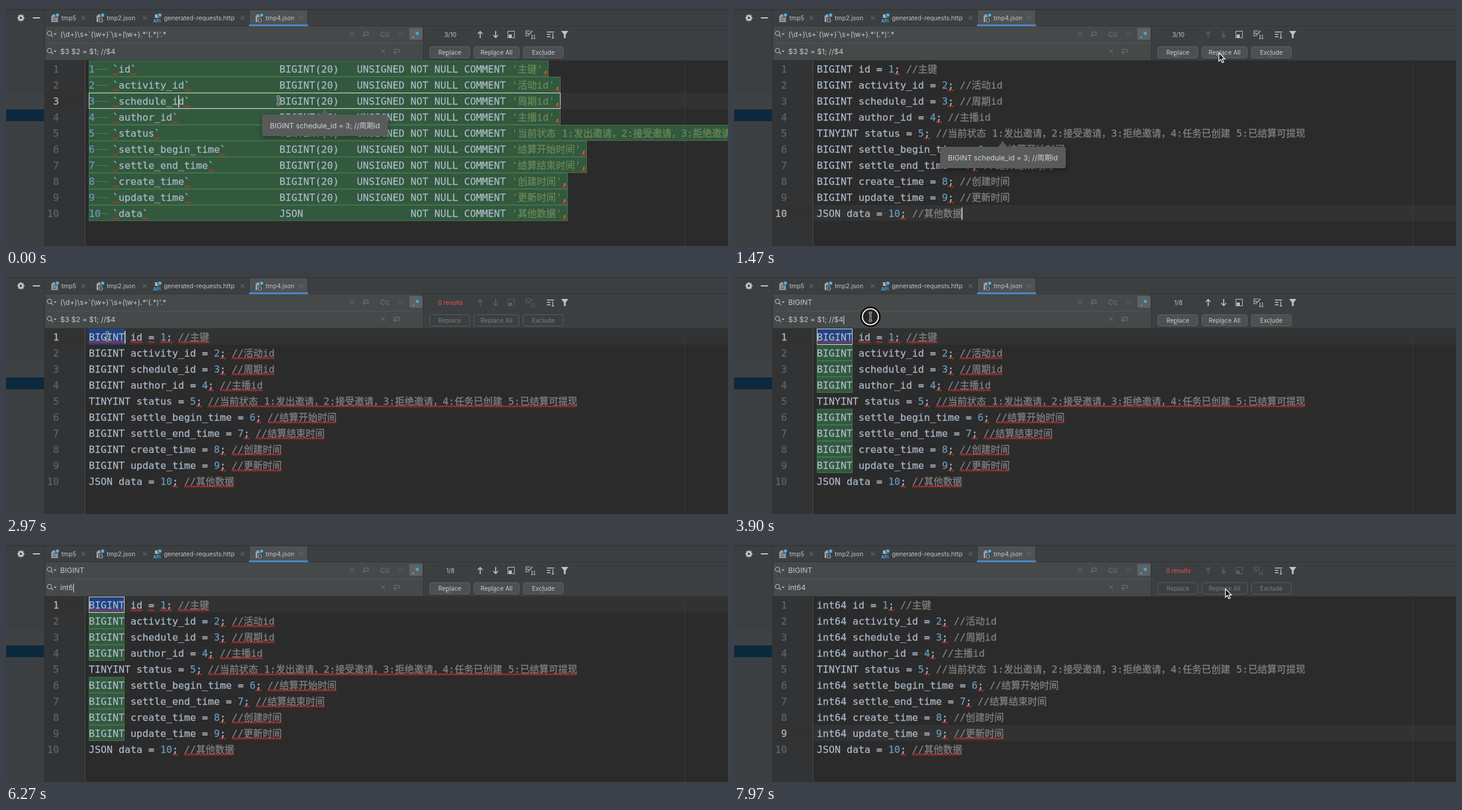
Animation of 1212x404 px, one loop 8 s. Source, as an HTML page with a canvas:

```html
<!DOCTYPE html>
<html lang="zh">
<head>
<meta charset="utf-8">
<style>
html, body { margin: 0; height: 100%; overflow: hidden; background: #2b2b2b; }
canvas { display: block; }
</style>
</head>
<body>
<canvas id="stage" width="1212" height="404"></canvas>
<script>
const g = document.getElementById('stage').getContext('2d');
const LOOP = 8000, TOP = 92, ROW = 27, LEFT = 139;
const UI = 'Inter, "Noto Sans CJK SC", sans-serif';
const MONO = '16.61px "DejaVu Sans Mono", monospace';
const HAN = '500 16px "Noto Sans CJK SC", "Noto Sans CJK", sans-serif';
const INK = '#a9b7c6', NUM = '#6897bb', STR = '#6a8759', NOTE = '#808080', ICON = '#afb1b3', DIM = '#5c5f61';
const FAINT = '#686b6d', EDGE = '#323537';

// Moments at which the state changes
const AT = { replace: 1420, recount: 1530, popupOff: 1640, reparse: 1900, select: 2850,
  find: 3250, focus: 3800, erase: 4450, hide: 4500, show: 6720, replace2: 7650 };
const TYPED = [[5000, 'i'], [5090, 'in'], [5400, 'int'], [6130, 'int6'], [6520, 'int64']];
const MOUSE = [[0, 457, 159], [450, 457, 159], [1280, 814, 79], [1750, 814, 79], [2600, 170, 105],
  [3330, 170, 105], [3780, 229, 72], [6740, 229, 72], [7450, 825, 79], [8000, 825, 79]];
const OLD_TEXT = '$3 $2 = $1; //$4';

const rows = [
  ['id', '主键'], ['activity_id', '活动id'], ['schedule_id', '周期id'], ['author_id', '主播id'],
  ['status', '当前状态 1:发出邀请，2:接受邀请，3:拒绝邀请，4:任务已创建 5:已结算可提现', 'TINYINT'],
  ['settle_begin_time', '结算开始时间'], ['settle_end_time', '结算结束时间'],
  ['create_time', '创建时间'], ['update_time', '更新时间'], ['data', '其他数据', 'JSON']
].map(([name, note, type = 'BIGINT']) => ({ name, note, type }));

const box = (x, y, w, h, c) => { g.fillStyle = c; g.fillRect(x, y, w, h); };
const frame = (x, y, w, h, c) => { g.strokeStyle = c; g.lineWidth = 1; g.strokeRect(x + .5, y + .5, w - 1, h - 1); };
function path(points, c, w = 1.3, fill) {
  g.beginPath();
  points.forEach(([x, y]) => g.lineTo(x, y));
  if (fill) { g.closePath(); g.fillStyle = fill; g.fill(); }
  if (c) { g.strokeStyle = c; g.lineWidth = w; g.stroke(); }
}
const line = (x, y, x2, y2, c, w) => path([[x, y], [x2, y2]], c, w);
function disc(x, y, r, fill, c, w = 1.3) {
  g.beginPath(); g.arc(x, y, r, 0, 7);
  if (fill) { g.fillStyle = fill; g.fill(); }
  if (c) { g.strokeStyle = c; g.lineWidth = w; g.stroke(); }
}
function round(x, y, w, h, r, fill, c) {
  g.beginPath(); g.roundRect(x, y, w, h, r);
  if (fill) { g.fillStyle = fill; g.fill(); }
  if (c) { g.strokeStyle = c; g.lineWidth = 1; g.stroke(); }
}
function label(s, x, y, size = 10.3, c = '#c0c2c4', align = 'left', weight = 400) {
  g.font = `${weight} ${size}px ${UI}`;
  g.fillStyle = c; g.textAlign = align;
  g.fillText(s, x, y);
  return g.measureText(s).width;
}
const cross = (x, y, c = FAINT, r = 3.2) => {
  line(x - r, y - r, x + r, y + r, c, 1.1); line(x - r, y + r, x + r, y - r, c, 1.1);
};

// Code sits on a grid: 10px per Latin character, 16px per Han character
const step = ch => ch > '\u2e80' ? 16 : 10;
const width = s => [...s].reduce((w, ch) => w + step(ch), 0);
const rowY = i => TOP + ROW * i;
function code(s, x, i, c) {
  g.textAlign = 'left';
  for (const ch of s) {
    if (ch === ' ') box(x + 4, rowY(i) + 14, 2, 1, 'rgba(150,160,150,.25)');
    else {
      g.font = ch > '\u2e80' ? HAN : MONO;
      g.fillStyle = g.strokeStyle = c;
      g.lineWidth = .3;
      g.fillText(ch, x, rowY(i) + 20);
      g.strokeText(ch, x, rowY(i) + 20);
    }
    x += step(ch);
  }
  return x;
}
function squiggle(x, x2, i) {
  const pts = [];
  for (let k = 0; x + k * 2 <= x2; k++) pts.push([x + k * 2, rowY(i) + (k % 2 ? 21.5 : 24)]);
  path(pts, '#c93030', 1.1);
}

function sqlRow({ name, note, type }, i) {
  const kind = type === 'JSON' ? type.padEnd(22)
    : (type + (type === 'BIGINT' ? '(20)' : '(4)')).padEnd(13) + 'UNSIGNED ';
  const end = 859 + width(note) + 20;
  box(LEFT, rowY(i), end - LEFT, ROW, '#32593d');
  frame(LEFT, rowY(i), end - LEFT, ROW, i === 2 ? '#d4d8d4' : '#447350');
  const x = code(String(i + 1), LEFT, i, NUM);
  line(x + 1, rowY(i) + 14.5, 173, rowY(i) + 14.5, '#567560', 1);
  code(('`' + name + '`').padEnd(28) + kind + 'NOT NULL COMMENT ', 179, i, INK);
  const q = code(`'${note}'`, 849, i, STR);
  code(',', q, i, '#cc7832');
  squiggle(179, 190, i);
  squiggle(189 + width(name), 199 + width(name), i);
  squiggle(q, q + 10, i);
}

function protoRow({ name, note, type }, i, t) {
  const done = t >= AT.replace2, big = type === 'BIGINT';
  if (big && t >= AT.find && !done) {
    box(LEFT, rowY(i), 60, ROW, i ? '#32593d' : '#214283');
    frame(LEFT, rowY(i), 60, ROW, i ? '#447350' : '#d4d8d4');
  } else if (!i && t >= AT.select && !done) box(LEFT, rowY(i), 60, ROW, '#214283');
  const a = code((done && big ? 'int64' : type) + ' ', LEFT, i, INK);
  const b = code(name + ' = ', a, i, INK);
  const semi = code(String(i + 1), b, i, NUM);
  const n = code('; ', semi, i, INK);
  const end = code('//' + note, n, i, NOTE);
  const checked = t >= AT.reparse && !done;
  if (checked && i === 0) {
    squiggle(LEFT, LEFT + 60, i); squiggle(a, a + width(name), i);
    squiggle(b - 20, b - 10, i); squiggle(b, b + 20, i);
  } else squiggle(semi, semi + 10, i);
  if (checked || (done && i > 7)) squiggle(n, end, i);
}

function popup(x, y) {
  const fill = '#595b5b';
  g.save();
  g.shadowColor = 'rgba(0,0,0,.35)'; g.shadowBlur = 8; g.shadowOffsetY = 3;
  round(x, y, 211, 36, 4, fill);
  g.restore();
  path([[x + 97, y + 1], [x + 105, y - 10], [x + 113, y + 1]], null, 0, fill);
  label('BIGINT schedule_id = 3; //周期id', x + 13, y + 23, 12.1, '#d0d2d3');
}

function tab(x, text, closeX, kind) {
  if (kind === 'api') {
    path([[x + 2, 20], [x + 2, 14], [x + 9, 14], [x + 9, 20]], null, 0, ICON);
    label('API', x - 1, 28, 7.5, '#40a6d8', 'left', 700);
  } else {
    path([[x, 27], [x, 17], [x + 3, 14], [x + 11, 14], [x + 11, 27]], null, 0, '#9aa1a6');
    if (kind === 'json') {
      box(x + 3, 19, 9, 9, '#3c3f41');
      label('{}', x + 3, 27, 9, ICON, 'left', 700);
    } else for (const y of [19, 22, 24.5]) line(x + 2, y, x + 9, y, '#4a4e50', 1);
  }
  disc(x + 10, 15.5, 4, '#3c3f41');
  disc(x + 10, 15.5, 3.2, '#3592c4');
  path([[x + 10, 13.5], [x + 10, 16], [x + 12, 16]], '#d5e5ee', .9);
  label(text, x + 17, 24);
  cross(closeX, 20);
}

function button(x, w, text, key, on) {
  round(x + .5, 68.5, w - 1, 19, 3, on ? '#4c5052' : null, on ? '#5f6365' : '#595c5e');
  const c = on ? '#c8cacc' : '#7b7e80', tw = label(text, x + w / 2, 82, 10.2, c, 'center');
  const u = x + w / 2 - tw / 2 + g.measureText(text.slice(0, key)).width;
  if (on) line(u, 84, u + g.measureText(text[key]).width, 84, c, .8);
}

function field(y, text, caret) {
  disc(73, y - 1, 3.7, null, ICON, 1.2);
  line(75.7, y + 1.7, 79, y + 5, ICON, 1.3);
  path([[80, y - 1], [85, y - 1], [82.5, y + 2]], null, 0, ICON);
  const w = label(text, 91, y + 5, 12.1, '#c6c9cb');
  if (caret) box(Math.round(91 + w), y - 6, 1, 15, '#dddddd');
}
function returnIcon(x, y) {
  path([[x - 4, y - 4], [x + 5, y - 4], [x + 5, y + 1], [x - 4, y + 1]], FAINT);
  path([[x - 1, y - 2], [x - 4, y + 1], [x - 1, y + 4]], FAINT);
}

function chrome(t) {
  box(0, 0, 1212, 92, '#3c3f41');
  box(0, 92, 65, 312, '#3c3f41');
  box(0, 6, 1212, 1, '#2f3133');
  box(0, 147, 64, 27, '#3f4244');
  box(0, 174, 64, 20, '#0d293e');
  box(64, 7, 1, 397, EDGE);

  for (let k = 0; k < 8; k++) {
    const a = k * Math.PI / 4, c = Math.cos(a), s = Math.sin(a);
    line(25 + c * 3, 20 + s * 3, 25 + c * 6, 20 + s * 6, '#c4c6c8', 2.4);
  }
  disc(25, 20, 3.2, null, '#c4c6c8', 2.6);
  box(45, 19, 12, 2, '#c4c6c8');

  box(408, 7, 99, 27, '#4e5254');
  for (const x of [408, 506]) box(x, 7, 1, 24, EDGE);
  tab(76, 'tmp5', 130);
  tab(152, 'tmp2.json', 233, 'json');
  tab(248, 'generated-requests.http', 397, 'api');
  tab(419, 'tmp4.json', 495, 'json');
  box(65, 33, 1147, 1, EDGE);
  box(408, 31, 99, 3, '#4a88c7');

  box(66, 34, 634, 57, '#45494a');
  box(66, 62, 634, 1, '#505355');
  box(700, 34, 1, 57, EDGE);
  box(65, 91, 1147, 1, EDGE);

  const typed = TYPED.filter(k => t >= k[0]).pop();
  const left = t < AT.erase ? 16 : Math.max(0, 16 - Math.floor((t - AT.erase) / 30));
  field(47, t < AT.find ? "(\\d+)\\s+`(\\w+)`\\s+(\\w+).*'(.*)'.*" : 'BIGINT');
  field(76, typed ? typed[1] : OLD_TEXT.slice(0, left), t >= AT.focus && t < AT.replace2);

  cross(581, 47); cross(633, 76);
  returnIcon(603, 48); returnIcon(655, 77);
  label('Cc', 636, 52, 12, FAINT, 'center', 600);
  label('W', 663, 51, 10, '#575b5d', 'center');
  label('··', 688, 80, 11, '#5c6062', 'center');
  round(677, 37, 22, 20, 2, '#5c6164');
  label('.*', 688, 54, 15, '#4fb4e6', 'center', 700);

  const none = (t >= AT.recount && t < AT.find) || t >= AT.replace2;
  const old = t < AT.recount;
  label(none ? '0 results' : old ? '3/10' : '1/8', 746, 52, 10.2, none ? '#f0524f' : '#c0c2c4', 'center');
  const arrows = none || (t >= AT.replace && old) ? DIM : '#c0c2c4';
  const mark = none ? DIM : '#c0c2c4';
  line(796, 43, 796, 54, arrows, 1.7);
  path([[792, 47], [796, 43], [800, 47]], arrows, 1.7);
  line(822, 42, 822, 53, arrows, 1.7);
  path([[818, 49], [822, 53], [826, 49]], arrows, 1.7);
  frame(842, 42, 12, 12, mark); box(844, 48, 5, 5, mark);
  path([[881, 42], [873, 42], [873, 50], [878, 50]], mark, 1.2);
  path([[875, 45], [878, 48], [884, 42]], mark, 1.4);
  for (const x of [883, 887]) { line(x, 48, x, 55, mark, 1.2); line(x - 1.5, 55, x + 1.5, 55, mark, 1); }
  for (const [y, w] of [[44, 12], [48, 6], [52, 6]]) box(908, y - 1, w, 1.5, '#c0c2c4');
  line(918, 46, 918, 54, '#c0c2c4'); line(916, 54, 920, 54, '#c0c2c4');
  path([[932, 42], [944, 42], [939.5, 48], [939.5, 54], [936.5, 54], [936.5, 48]], null, 0, '#c0c2c4');

  button(711, 68, 'Replace', 2, !none);
  button(785, 77, 'Replace All', 4, !none);
  button(868, 68, 'Exclude', 3, !none);
}

function editor(t) {
  box(65, TOP, 1147, 312, '#2b2b2b');
  box(65, TOP, 67, 312, '#313335');
  const cur = t < AT.replace ? 2 : t < AT.select ? 9 : t < AT.replace2 ? 0 : 8;
  box(65, rowY(cur), 1147, ROW, '#323232');
  box(132, TOP, 1, 312, '#4b4d4e');
  box(1139, TOP, 1, 312, '#3a3a3a');
  rows.forEach((r, i) => {
    const n = String(i + 1);
    code(n, 89 - n.length * 10, i, i === cur ? '#b4b5b6' : '#606366');
    t < AT.replace ? sqlRow(r, i) : protoRow(r, i, t);
  });
  if (t < AT.find) box([199, 0, 289][cur] || 382, rowY(cur) + 4, 1.5, 21, '#dcdcdc');
  if (t < AT.replace) popup(430, 183);
  else if (t < AT.popupOff) popup(346, 237);
}

function pointer(t) {
  if (t >= AT.hide && t < AT.show) return;
  const k = MOUSE.findIndex((m, n) => n && t <= m[0]);
  const [t0, x0, y0] = MOUSE[k - 1], [t1, x1, y1] = MOUSE[k];
  let p = (t - t0) / (t1 - t0);
  p = p * p * (3 - 2 * p);
  const x = x0 + (x1 - x0) * p, y = y0 + (y1 - y0) * p;
  if (x > 570 && y < TOP) {
    path([[0, 0], [0, 14], [3.2, 11], [5.6, 16.3], [8, 15.3], [5.7, 10], [10, 10]]
      .map(([a, b]) => [x + a, y + b]).concat([[x, y]]), '#f2f2f2', 1.4, '#050505');
    return;
  }
  if (t >= AT.focus && t < 4020) {
    disc(x, y, 15.5, '#242526', '#000000', 3);
    disc(x, y, 13.5, null, '#f2f2f2', 2);
  }
  for (const [c, w] of [['#f2f2f2', 2.8], ['#101010', 1.1]]) {
    path([[x - 2.5, y - 7.5], [x, y - 6], [x + 2.5, y - 7.5]], c, w);
    path([[x - 2.5, y + 7.5], [x, y + 6], [x + 2.5, y + 7.5]], c, w);
    line(x, y - 6, x, y + 6, c, w);
    line(x - 1.5, y + 2, x + 1.5, y + 2, c, w);
  }
}

function draw(now) {
  const t = now % LOOP;
  editor(t);
  chrome(t);
  pointer(t);
  requestAnimationFrame(draw);
}
requestAnimationFrame(draw);
</script>
</body>
</html>
```
